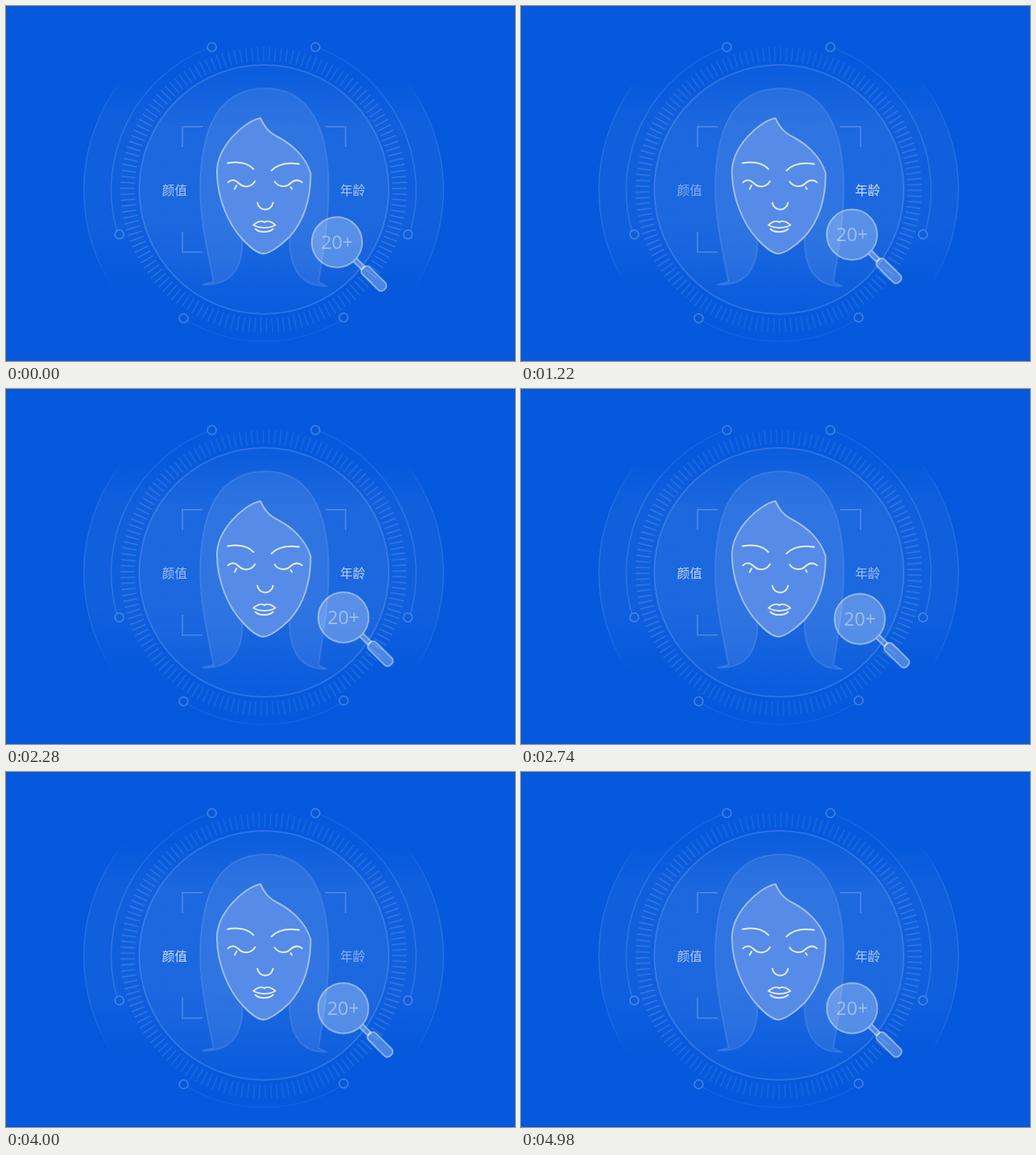
These frames come from a looping animation (649 px wide and 453 px high, 5 s). An HTML page:

```html
<!DOCTYPE html>
<html lang="zh">
<head>
<meta charset="utf-8">
<title>Face scan</title>
<style>
  html, body { margin: 0; width: 100%; height: 100%; overflow: hidden; background: #0659dc; }
  svg { display: block; width: 649px; height: 453px; fill: none; stroke-linecap: round; stroke-linejoin: round; }
  text { fill: #fff; stroke: none; }
  .label { font: 16px "Noto Sans CJK SC", "Noto Sans CJK", sans-serif; }
  .age { font: 24px "Open Sans", "Noto Sans", sans-serif; text-anchor: middle; fill-opacity: .42; }
  .ring { transform-origin: 328.5px 234.5px; animation: spin 5s steps(250) infinite; }
  .lens { animation: patrol 5s linear infinite; }
  .looks { animation: looks 5s linear infinite; }
  .years { animation: years 5s linear infinite; }
  @keyframes spin { to { transform: rotate(360deg); } }
  @keyframes patrol {
    0%, 100% { transform: translate(0, 0); }
    25% { transform: translate(0, -10px); }
    50% { transform: translate(10px, -10px); }
    75% { transform: translate(10px, 0); }
  }
  @keyframes looks {
    0%, 100% { opacity: .65; }
    33.3% { opacity: .4; }
    66.7% { opacity: .9; }
  }
  @keyframes years {
    0%, 100% { opacity: .65; }
    33.3% { opacity: .9; }
    66.7% { opacity: .4; }
  }
</style>
</head>
<body>
<svg viewBox="0 0 649 453">
  <defs>
    <linearGradient id="glow" gradientUnits="userSpaceOnUse" x1="0" y1="88" x2="0" y2="362">
      <stop offset="0" stop-color="#fff" stop-opacity="0"/>
      <stop offset=".22" stop-color="#fff" stop-opacity=".04"/>
      <stop offset=".7" stop-color="#fff" stop-opacity=".04"/>
      <stop offset="1" stop-color="#fff" stop-opacity="0"/>
    </linearGradient>
    <linearGradient id="rim" gradientUnits="userSpaceOnUse" x1="0" y1="90" x2="0" y2="362">
      <stop offset="0" stop-color="#fff" stop-opacity="0"/>
      <stop offset=".15" stop-color="#fff" stop-opacity=".1"/>
      <stop offset=".5" stop-color="#fff" stop-opacity=".15"/>
      <stop offset=".85" stop-color="#fff" stop-opacity=".09"/>
      <stop offset="1" stop-color="#fff" stop-opacity="0"/>
    </linearGradient>
    <linearGradient id="disc" gradientUnits="userSpaceOnUse" x1="0" y1="75" x2="0" y2="394">
      <stop offset="0" stop-color="#fff" stop-opacity=".025"/>
      <stop offset=".25" stop-color="#fff" stop-opacity=".05"/>
      <stop offset=".75" stop-color="#fff" stop-opacity=".05"/>
      <stop offset="1" stop-color="#fff" stop-opacity=".02"/>
    </linearGradient>
    <linearGradient id="shade" gradientUnits="userSpaceOnUse" x1="0" y1="52" x2="0" y2="417">
      <stop offset="0" stop-color="#fff" stop-opacity=".5"/>
      <stop offset=".3" stop-color="#fff"/>
      <stop offset=".7" stop-color="#fff"/>
      <stop offset="1" stop-color="#fff" stop-opacity=".5"/>
    </linearGradient>
    <mask id="fade" maskUnits="userSpaceOnUse" x="0" y="0" width="649" height="453">
      <rect width="649" height="453" fill="url(#shade)"/>
    </mask>
  </defs>

  <circle cx="328.5" cy="235" r="229.2" fill="url(#glow)" stroke="url(#rim)" stroke-width="1.3"/>
  <circle cx="329" cy="234" r="159" fill="url(#disc)" stroke="#fff" stroke-opacity=".14" stroke-width="2"/>

  <g mask="url(#fade)">
    <!-- rotating dial -->
    <g class="ring">
      <circle cx="328.5" cy="234.5" r="173.3" transform="rotate(-90 328.5 234.5)" pathLength="149"
        stroke="#fff" stroke-opacity=".16" stroke-width="18.4" stroke-dasharray=".22 .78"
        stroke-dashoffset=".11" stroke-linecap="butt"/>
    </g>
    <!-- orbit arcs -->
    <g stroke="#fff" stroke-opacity=".13" stroke-width="1.6">
      <path d="M257 54A194.5 194.5 0 0 0 141 286M400 54A194.5 194.5 0 0 1 516 286"/>
      <path d="M231.500 402A194.500 194.500 0 0 0 425.500 402" stroke-width="1.3"/>
    </g>
  </g>
  <g stroke="#fff" stroke-opacity=".22" stroke-width="1.8">
    <circle cx="262.500" cy="52.500" r="5.600"/>
    <circle cx="394.500" cy="52.500" r="5.600"/>
    <circle cx="144.500" cy="291.500" r="5.600"/>
    <circle cx="512.500" cy="291.500" r="5.600"/>
    <circle cx="226.500" cy="398.500" r="5.600"/>
    <circle cx="430.500" cy="397.500" r="5.600"/>
  </g>

  <path d="M225 180V154H251M407 154H433V180M225 288V314H251" stroke="#fff" stroke-opacity=".18"
    stroke-width="2" stroke-linecap="butt" stroke-linejoin="miter"/>

  <g transform="translate(.5 .5)">
    <!-- hair -->
    <path d="M250 355L264 351.500C254 302 247 268 247 232C248 150 273 104.500 331 104.500C386 104.500 411 154 411 232
      C411 268 405 308 398 352L409 357C378 358 360 338 361 294L328 316L301 297C302 336 285 357 250 355Z"
      fill="#fff" fill-opacity=".085" stroke="#fff" stroke-opacity=".1" stroke-width="2"/>

    <!-- face -->
    <path d="M324 142.500C302 147 268 180 268.500 212C269 245 283 278 301 297C310 307 321 315.500 328 315.500
      C335 315.500 349 306 361 294C378 275 388 248 388 213C381 190 362 175 347 167C335 161 329 154 324 142.500Z"
      fill="#568ce7" stroke="#a1bff2" stroke-width="2"/>
    <g stroke="#e6eefc" stroke-width="2">
      <path d="M282 200C294 198 307 199 315 207.500M338 209.500C346 201 359 199 373 201"/>
      <path d="M282.500 224.500Q289 219 295 224.500C302 232 312 231.500 317 223M293.500 228.500L291 233"/>
      <path d="M342 223.500C347 231 357 231.500 363 225Q370 219 377 224.500M362.500 230.500L364 233"/>
      <path d="M320 250.500C322 262 338 262 340 250.500"/>
      <path d="M315 279C319 275.500 325 272.500 329 275.500C333 272.500 339 275.500 343 279C335 283.500 323 283.500 315 279Z"/>
      <path d="M317.500 284C322 289 335 289 340 284"/>
    </g>
  </g>

  <text class="label looks" x="199" y="241">颜值</text>
  <text class="label years" x="426" y="241">年龄</text>

  <!-- magnifier -->
  <g class="lens">
    <g stroke="#fff" stroke-opacity=".43" stroke-width="2" fill="#fff" fill-opacity=".27">
      <circle cx="422" cy="301.500" r="32.200"/>
      <g transform="translate(422 301.500) rotate(44.500)">
        <path d="M33 -3H47V3H33"/>
        <rect x="46.500" y="-6.500" width="39" height="13" rx="5.500"/>
      </g>
    </g>
    <text class="age" x="422" y="310">20+</text>
  </g>
</svg>
</body>
</html>
```
